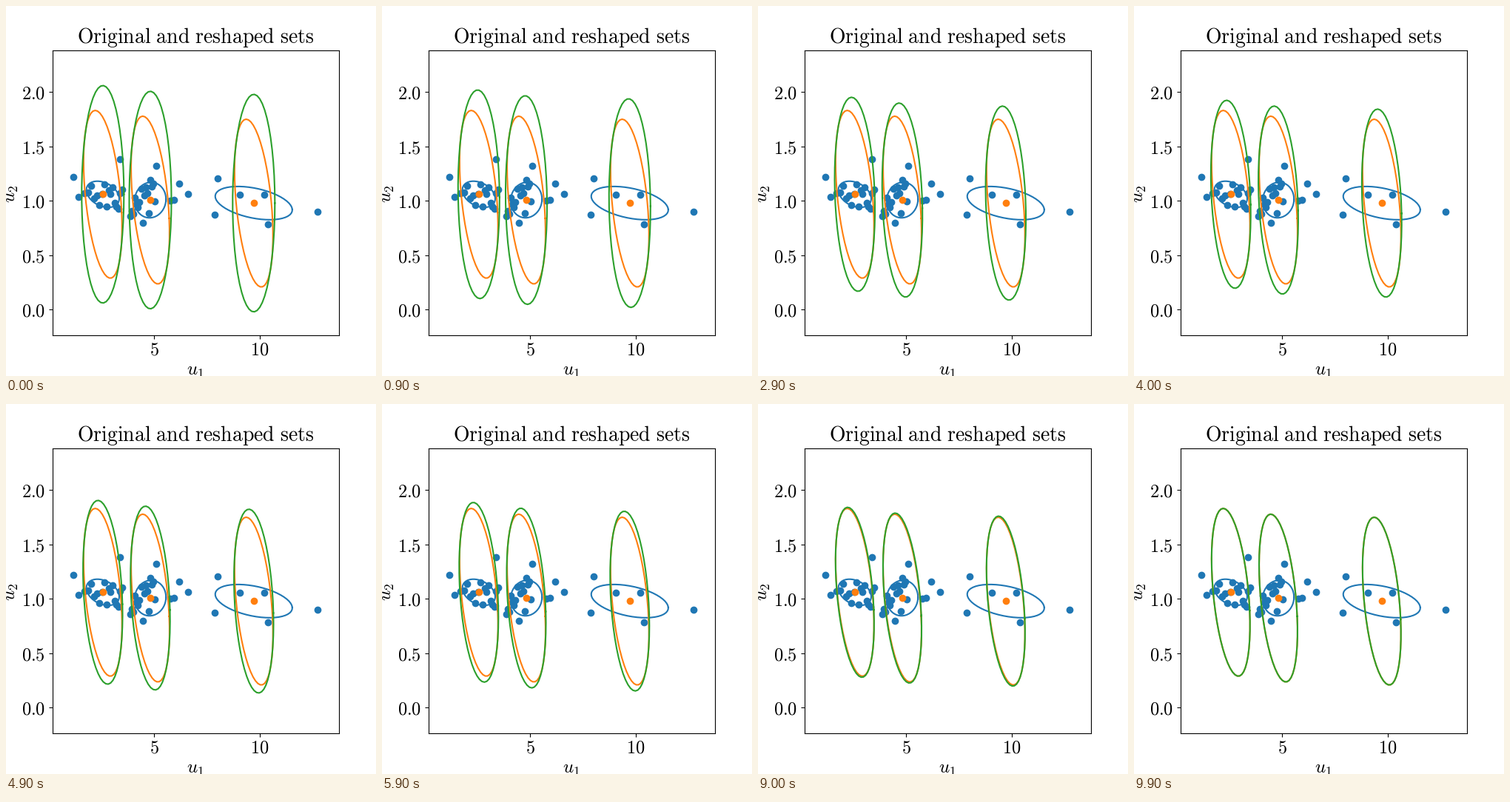
Animation of 500 by 500 pixels, one loop 10000 ms. Source, as a matplotlib script:

```python
import matplotlib.pyplot as plt
import numpy as np
from matplotlib.animation import FuncAnimation

FRAMES = 100
INTERVAL = 100
BLUE, ORANGE, GREEN = "C0", "C1", "C2"

plt.rcParams["mathtext.fontset"] = "cm"
rng = np.random.default_rng(4)

# Target metric of the reshaping, shared by all clusters
METRIC = np.array([[1.43, 0.665], [0.665, 1.99]])
angle = np.linspace(0, 2 * np.pi, 50)
circle = np.array([np.cos(angle), np.sin(angle)])


def covariance(sx, sy, r):
    return np.array([[sx * sx, r * sx * sy], [r * sx * sy, sy * sy]])


def ellipse(center, metric):
    """Points x with (x - center)^T metric (x - center) = 1."""
    vals, vecs = np.linalg.eigh(metric)
    root = vecs @ np.diag(vals ** -0.5) @ vecs.T
    return np.array(center)[:, None] + root @ circle


def band(n, x0, x1, mid, slope, half, widen, bunch=1.0):
    """Random points in a sloping band that may widen to the right."""
    x = x0 + (x1 - x0) * np.linspace(0, 1, n) ** bunch
    y = mid + slope * (x - x0)
    reach = half + widen * (x - x0)
    # One height per equal slice keeps the band evenly filled
    level = (rng.permutation(n) + 0.5) / n
    return np.column_stack([x, y + reach * (2 * level - 1)])


def roman(text):
    return r"$\mathrm{%s}$" % text.replace(" ", r"\ ")


centers = [(2.564, 1.060), (4.814, 1.007), (9.714, 0.979)]
spreads = [covariance(0.778, 0.1206, -0.33),
           covariance(0.743, 0.1635, 0.05),
           covariance(1.826, 0.153, -0.41)]

# Outliers are fixed, the dense parts are filled at random
outliers = [(1.17, 1.22), (3.36, 1.38), (5.10, 1.32), (6.18, 1.16),
            (6.60, 1.06), (5.76, 1.00), (5.94, 1.01),
            (8.00, 1.207), (7.87, 0.872), (9.06, 1.057),
            (10.21, 1.057), (10.39, 0.785), (12.74, 0.90)]
points = np.vstack([
    outliers,
    band(18, 1.41, 3.48, 1.09, -0.04, 0.06, 0.045, bunch=0.7),
    band(17, 3.87, 5.03, 1.04, -0.06, 0.22, 0.0),
])

fig, ax = plt.subplots(figsize=(5, 5), dpi=100)
ax.set_position([0.125, 0.11, 0.775, 0.77])
ax.set_xlim(0.170, 13.752)
ax.set_ylim(-0.2368, 2.3832)
yticks = np.arange(0, 2.5, 0.5)
ax.set_xticks([5, 10], [roman("5"), roman("10")])
ax.set_yticks(yticks, [roman(f"{y:.1f}") for y in yticks])
ax.tick_params(labelsize=17.5)
ax.tick_params(axis="x", pad=2)
ax.set_title(roman("Original and reshaped sets"), fontsize=20, pad=7.5)

label = dict(fontsize=18, ha="center", va="baseline", rotation_mode="anchor")
fig.text(256 / 500, 1 / 500, "$u_1$", **label)
fig.text(13 / 500, 1 - 253.5 / 500, "$u_2$", rotation=90, **label)

ax.scatter(*points.T, color=BLUE)
ax.scatter(*zip(*centers), color=ORANGE)
for center, spread in zip(centers, spreads):
    ax.plot(*ellipse(center, np.linalg.inv(spread)), color=BLUE)
    ax.plot(*ellipse(center, METRIC), color=ORANGE)
movers = [ax.plot(*ellipse(c, np.eye(2)), color=GREEN)[0] for c in centers]


def update(frame):
    a = frame / (FRAMES - 1)
    metric = (1 - a) * np.eye(2) + a * METRIC
    for line, center in zip(movers, centers):
        line.set_data(*ellipse(center, metric))
    return movers


anim = FuncAnimation(fig, update, frames=FRAMES, interval=INTERVAL,
                     repeat=True, repeat_delay=0)
plt.show()
```
